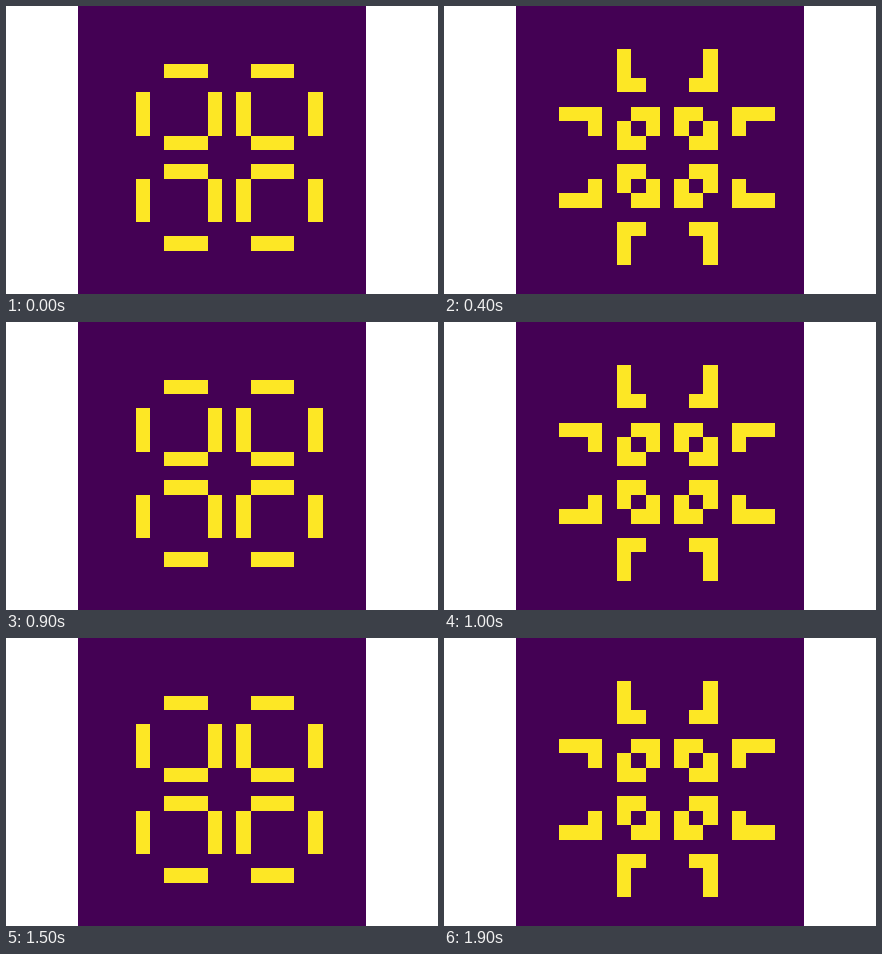
Animation, 432 px wide and 288 px high, one loop 2 s. Source, as an HTML page with a canvas:

```html
<!DOCTYPE html>
<html lang="en">
<head>
<meta charset="utf-8">
<title>Pulsar</title>
<style>
  html, body { margin: 0; width: 100%; height: 100%; overflow: hidden; background: #fff; }
  canvas { display: block; }
</style>
</head>
<body>
<canvas id="stage" width="432" height="288"></canvas>
<script>
const ctx = document.getElementById('stage').getContext('2d');
const SIZE = 20, LEFT = 72, SIDE = 288;
const STEP_MS = 100, LOOP_MS = 2000;

// Pulsar: bars on four lines, each spanning two runs of three cells.
const lines = [4, 9, 11, 16];
const runs = [6, 7, 8, 12, 13, 14];
const board = rule => Array.from({ length: SIZE }, (_, y) =>
  Array.from({ length: SIZE }, (_, x) => rule(x, y)));

const seed = board((x, y) =>
  (lines.includes(y) && runs.includes(x)) || (lines.includes(x) && runs.includes(y)));

function evolve(cells) {
  return board((x, y) => {
    let neighbours = 0;
    for (let dy = -1; dy <= 1; dy++)
      for (let dx = -1; dx <= 1; dx++)
        if ((dx || dy) && cells[y + dy]?.[x + dx]) neighbours++;
    return neighbours === 3 || (neighbours === 2 && cells[y][x]);
  });
}

const second = evolve(seed);
const phases = [seed, second, evolve(second)];
const edge = i => Math.round(i * SIDE / SIZE);

function draw(cells) {
  ctx.fillStyle = '#440154';
  ctx.fillRect(LEFT, 0, SIDE, SIDE);
  ctx.fillStyle = '#fde725';
  cells.forEach((row, y) => row.forEach((alive, x) => {
    if (alive) ctx.fillRect(LEFT + edge(x), edge(y), edge(x + 1) - edge(x), edge(y + 1) - edge(y));
  }));
}

const start = performance.now();
function tick() {
  const elapsed = Math.max(0, performance.now() - start) % LOOP_MS;
  draw(phases[Math.floor(elapsed / STEP_MS) % phases.length]);
  requestAnimationFrame(tick);
}
tick();
</script>
</body>
</html>
```
